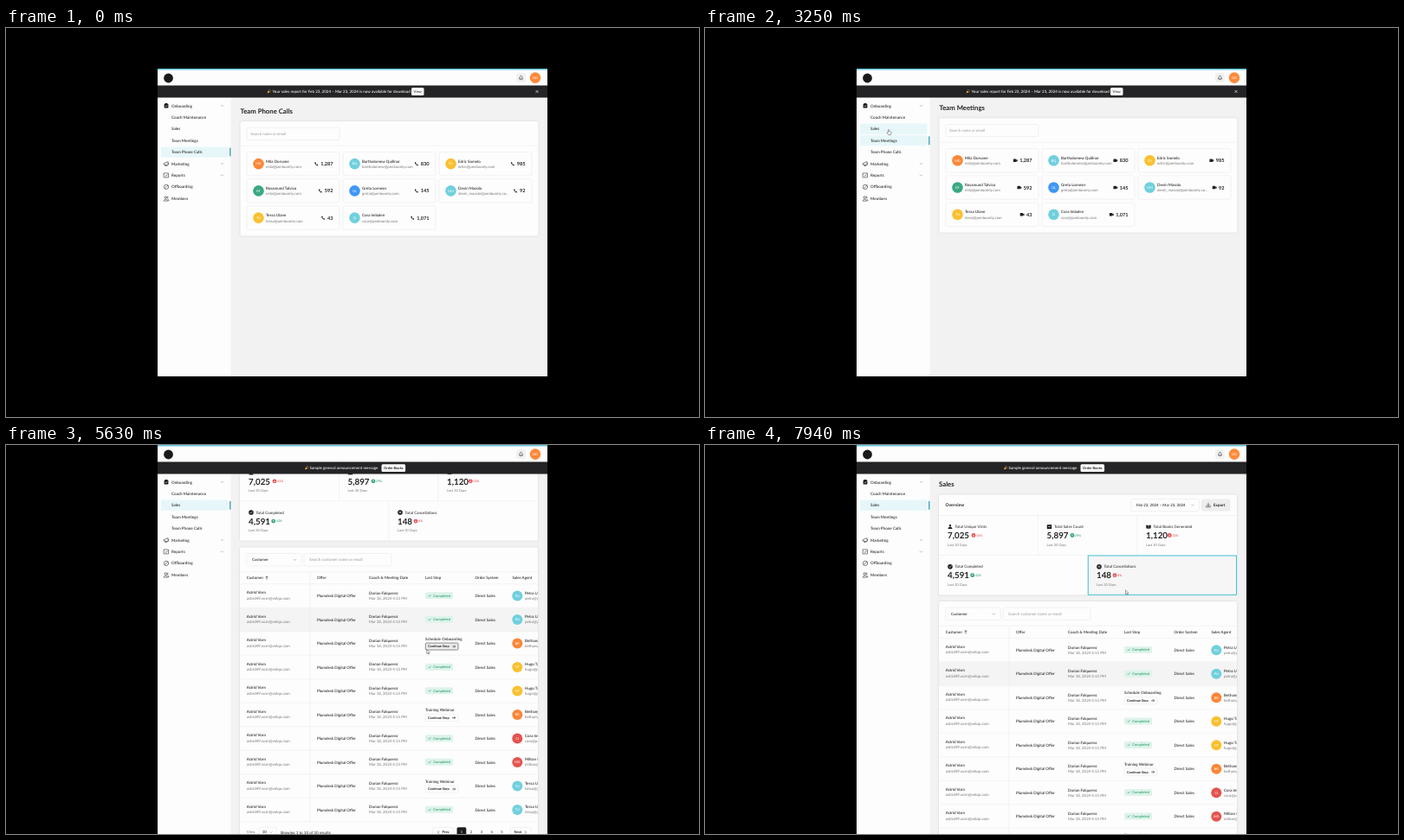
Recreate the animation shown at these times as an HTML page. Size 800 by 450 pixels, loop 8000 ms.

```html
<!DOCTYPE html>
<html lang="en">
<head>
<meta charset="utf-8">
<title>Team dashboard</title>
<style>
html, body { margin: 0; width: 100%; height: 100%; overflow: hidden; background: #000; }
svg { display: block; width: 100%; height: 100%; }
text { font-family: Lato, "Open Sans", sans-serif; font-weight: 500; fill: #222; text-rendering: geometricPrecision; white-space: pre; }
.b { font-weight: 700; }
.r { font-weight: 400; }
.g { font-weight: 400; fill: #777; }
.p { font-weight: 400; fill: #999; }
.w { fill: #fff; }
.up { fill: #2a9c70; }
.dn { fill: #e5484d; }
.ln { fill: none; stroke: #333; stroke-width: .6; stroke-linecap: round; stroke-linejoin: round; }
.rule { stroke: #ececec; stroke-width: .6; fill: none; }
.box { fill: #fdfdfd; stroke: #e9e9e9; stroke-width: .6; }
.panel { fill: #fdfdfd; filter: drop-shadow(0 .5px .8px #0002); }
</style>
</head>
<body>
<svg id="stage" viewBox="0 0 800 450" preserveAspectRatio="none"></svg>
<script>
const ORANGE = '#fb8637', CYAN = '#70d0de', YELLOW = '#fac02e', GREEN = '#3aa981', BLUE = '#3f97f4', RED = '#e5534f';

// Drawing helpers; text y is the optical middle of the line
const text = (x, y, s, size = 4.5, cls = '', anchor = 'start') =>
  `<text x="${x}" y="${(y + size * .35).toFixed(2)}" font-size="${size}" class="${cls}" text-anchor="${anchor}">${s}</text>`;
const rect = (x, y, w, h, fill, r = 0, cls = '') =>
  `<rect x="${x}" y="${y}" width="${w}" height="${h}" rx="${r}" ${fill ? `fill="${fill}"` : ''} class="${cls}"/>`;
const circle = (x, y, r, fill) => `<circle cx="${x}" cy="${y}" r="${r}" fill="${fill}"/>`;
const line = (d, cls = 'rule') => `<path d="${d}" class="${cls}"/>`;
const icon = (x, y, d, cls = 'ln', extra = '') => `<path transform="translate(${x} ${y})" d="${d}" class="${cls}" ${extra}/>`;
const chevron = (x, y, s = 1) => icon(x, y, `M${-1.3 * s} ${-.6 * s}L0 ${.7 * s}L${1.3 * s} ${-.6 * s}`, 'ln', 'style="stroke:#777;stroke-width:.45"');
const avatar = (x, y, r, fill, s) => circle(x, y, r, fill) + text(x, y, s, 3.8, 'w', 'middle');
const initials = name => name.split(' ').map(w => w[0]).join('');
const numWidth = (s, size) => [...s].reduce((w, c) => w + (c === ',' ? .24 : .58), 0) * size;

const NAV = ['Onboarding', 'Coach Maintenance', 'Sales', 'Team Meetings', 'Team Phone Calls', 'Marketing', 'Reports', 'Offboarding', 'Members'];
const navY = i => 42.9 + 13.42 * i;
const navRow = (i, id) => `<g id="${id}">${rect(179, navY(i) - 6.2, 77.5, 12.4, '#e7f7f9', 1.2)}</g>`;
const navBar = i => rect(258, navY(i) - 5, 1.5, 10, '#4aa9bb', .5);

function party(x) {
  return icon(x, 26.5, 'M-2 2L-.7-1.3L1.2.7Z', '', 'fill="#f5b63c"') + circle(x + 1.4, 25, .6, '#ef5a7a') +
    circle(x + .3, 24.3, .45, '#5cc6e8') + circle(x + 1.9, 26.6, .45, '#f5d04a');
}

function navIcons() {
  const at = i => navY(i), x = 185;
  return rect(182.6, at(0) - 2.3, 4.8, 5, '#1c1c1c', .9) + rect(183.9, at(0) - 3, 2.2, 1.4, '#1c1c1c', .4) +
    icon(x, at(0), 'M-.9 .4L-.2 1L1-.4', 'ln', 'style="stroke:#fff"') +
    icon(x, at(5), 'M-2.6-.4L2-2.4V2L-2.6 .9ZM-1.5 1.2L-1 2.7H.2V1.6M2.6-.8V.5') +
    icon(x, at(6), 'M-2.5-2.5H2.5V2.5H-2.5ZM-1.1 .1L-.2 1L1.3-.8') +
    icon(x, at(7), 'M2.7 0A2.7 2.7 0 1 1-2.7 0A2.7 2.7 0 1 1 2.7 0M-1.9 1.9L1.9-1.9') +
    icon(x, at(8), 'M.6-1.3A1.3 1.3 0 1 1-2-1.3A1.3 1.3 0 1 1 .6-1.3M-2.8 2.5C-2.8 .2 1.4 .2 1.4 2.5ZM1.4-2.5C2.6-2 2.5-.5 1.4-.2M2 .8C2.7 1.1 3 1.8 3 2.5H2.2');
}

function frame(height, banner, highlights) {
  const nav = NAV.map((s, i) => text(191, navY(i), s, 4.6)).join('');
  return rect(175, 33, 84.5, height - 33, '#fdfdfd') + highlights + nav + navIcons() +
    [0, 5, 6].map(i => chevron(249.5, navY(i))).join('') +
    rect(175, 0, 450, 19.6, '#fdfdfd') + rect(175, 0, 450, 1.5, '#62c9dc') +
    circle(187.5, 11, 5.4, '#1a1a1a') +
    rect(589, 5, 11, 11, '#f1f1f1', 3) +
    icon(594.5, 10.4, 'M-1.9 1.2C-1.1 .2-1.6-2.1 0-2.1S1.1 .2 1.9 1.2ZM-.5 2.2H.5') +
    avatar(611, 10.6, 6.3, '#ff8a3c', 'DG') +
    rect(175, 19.5, 450, 14, '#242325') + banner;
}

// Team pages
const TEAM = [
  ['Mila Dorvane', 'mila', '1,287', ORANGE], ['Bartholomew Quillnar', 'bartholomew', '830', CYAN], ['Edric Somelo', 'edric', '985', YELLOW],
  ['Rosamund Talvico', 'mila', '592', GREEN], ['Greta Lommer', 'greta', '145', BLUE], ['Devin Masola', 'devin_masola', '92', CYAN],
  ['Tessa Ulane', 'tessa', '43', YELLOW], ['Cora Imbalen', 'cora', '1,071', CYAN]];
const PHONE = 'M-1.9-1.5L-1-2.1L-.1-.8L-.6-.1C-.3 .5 .1 .8 .6 1L1.2 .4L2.2 1.3L1.6 2.1C-.4 2.2-2-.2-1.9-1.5Z';
const VIDEO = 'M-2.3-1.2Q-2.3-1.7-1.8-1.7H.7Q1.2-1.7 1.2-1.2V-.6L2.5-1.4V1.4L1.2 .6V1.2Q1.2 1.7 .7 1.7H-1.8Q-2.3 1.7-2.3 1.2Z';

function teamPage(title, glyph) {
  const cards = TEAM.map(([name, user, count, color], i) => {
    const x = 278 + 111 * (i % 3), y = 96.4 + 31.25 * Math.floor(i / 3), mid = y + 13.7;
    const mail = user + (user.length > 11 ? '@penloomly.co…' : '@penloomly.com');
    return rect(x, y, 107, 27.4, '', 2, 'box') + avatar(x + 13.5, mid, 6.3, color, initials(name)) +
      text(x + 22, mid - 3.1, name, 4.5) + text(x + 22, mid + 3.4, mail, 4.4, 'g') +
      text(x + 99.5, mid + .1, count, 5.6, 'b', 'end') +
      icon(x + 94.5 - numWidth(count, 5.6), mid, glyph, '', 'fill="#222"');
  }).join('');
  return text(270.5, 49.5, title, 7.75, 'b') + rect(270.5, 61, 344, 132.5, '', 2, 'panel') +
    rect(278, 68.3, 107, 14.2, '', 2, 'box') + text(282.2, 75.3, 'Search name or email', 4.4, 'p') +
    line('M270.5 89.2H614.5') + cards;
}

function teamScene() {
  const banner = party(303.5) +
    text(307.5, 26.5, 'Your sales report for Feb 23, 2024 – Mar 23, 2024 is now available for download', 4.52, 'w') +
    rect(468, 22, 14.5, 9, '#fdfdfd', 1.5) + text(475.2, 26.5, 'View', 4.1, '', 'middle') +
    icon(613, 26.5, 'M-1.3-1.3L1.3 1.3M1.3-1.3L-1.3 1.3', 'ln', 'style="stroke:#fff"');
  const marks = navRow(2, 'hoverSales') + navRow(3, 'hoverMeet') +
    `<g id="onCalls">${navRow(4, 'rowCalls')}${navBar(4)}</g><g id="onMeet">${navBar(3)}</g>`;
  return `<g id="team" transform="translate(0 47)">${rect(175, 0, 450, 356, '#f2f2f2')}
    <g id="calls">${teamPage('Team Phone Calls', PHONE)}</g>
    <g id="meets" transform="translate(0 -3.8)">${teamPage('Team Meetings', VIDEO)}</g>${frame(356, banner, marks)}</g>`;
}

// Sales page
const STATS = [
  [280, 94.5, 'Total Unique Visits', '7,025', '15%', 0, 30, 'M1.2-1.3A1.2 1.2 0 1 1-1.2-1.3A1.2 1.2 0 1 1 1.2-1.3M-2.5 2.6C-2.5-.4 2.5-.4 2.5 2.6Z'],
  [394.5, 94.5, 'Total Sales Count', '5,897', '29%', 1, 29.5, 'M-2.7-2.3H2.7V2.5H-2.7Z'],
  [509, 94.5, 'Total Books Generated', '1,120', '32%', 0, 27.3, 'M-2.7-2.1L-.2-1.5V2.4L-2.7 1.7ZM2.7-2.1L.2-1.5V2.4L2.7 1.7Z'],
  [280, 140.7, 'Total Completed', '4,591', '42%', 1, 28.7],
  [452, 140.7, 'Total Cancellations', '148', '4%', 0, 21]];
const DISC = 'M2.8 0A2.8 2.8 0 1 1-2.8 0A2.8 2.8 0 1 1 2.8 0';
const CHECK = 'M-1.2 .1L-.3 1L1.3-.9', CROSS = 'M-.9-.9L.9 .9M.9-.9L-.9 .9';

function stat([x, y, label, value, pct, up, gap, glyph]) {
  const tone = up ? '#2a9c70' : '#e5484d';
  const mark = up ? (label === 'Total Completed' ? CHECK : 'M-1.2 0H1.2') : CROSS;
  return icon(x + 3, y, glyph || DISC, '', 'fill="#1c1c1c"') +
    (glyph && !up ? '' : icon(x + 3, y, mark, 'ln', 'style="stroke:#fff"')) +
    text(x + 8.5, y, label, 4.5, 'r') + text(x, y + 10.3, value, 9.8, 'b') +
    circle(x + gap, y + 10, 2.4, tone) +
    icon(x + gap, y + 10, up ? 'M0 1.1V-1.1M-.9-.2L0-1.1L.9-.2' : 'M0-1.1V1.1M-.9 .2L0 1.1L.9 .2', 'ln', 'style="stroke:#fff;stroke-width:.5"') +
    text(x + gap + 3.1, y + 10, pct, 3.6, up ? 'up' : 'dn') + text(x, y + 20.6, 'Last 30 Days', 4, 'g');
}

const AGENTS = { P: ['Petra Ullem', CYAN], B: ['Bethany Rolk', ORANGE], H: ['Hugo Tarnel', YELLOW], C: ['Cora Imbalen', RED], M: ['Milton Dray', RED], T: ['Tessa Ulane', CYAN] };
const STEPS = { 2: 'Schedule Onboarding', 5: 'Training Webinar', 8: 'Training Webinar' };
const rowY = i => 223.4 + 27.5 * i;

function tableRow(key, i) {
  const top = rowY(i), y = top + 13.6, [name, color] = AGENTS[key];
  const step = STEPS[i]
    ? text(484, y - 5.1, STEPS[i], 4.5) +
      `<rect id="step${i}" x="484.3" y="${y - .3}" width="37.7" height="8" rx="1.2" class="box"/>` +
      text(487, y + 3.7, 'Continue Step', 3.9, 'b') + icon(517, y + 3.7, 'M-1.6 0H1.6M.3-1.3L1.6 0L.3 1.3')
    : rect(484, y - 4, 32, 8, '#ddf3e9', 1.5) + icon(489, y, CHECK, 'ln', 'style="stroke:#2a9468"') +
      text(493.3, y, 'Completed', 4.1, 'up');
  return (i === 1 ? rect(270, top, 344, 27.5, '#f4f4f4') : '') +
    text(277.7, y - 3.8, 'Astrid Vorn', 4.5) + text(277.7, y + 2.8, 'astrid49.vorn@velqo.com', 4.5, 'g') +
    text(359, y + .1, 'Plumdesk Digital Offer', 4.5) +
    text(419, y - 3, 'Dorian Falquerez', 4.5) + text(419, y + 3.1, 'Mar 18, 2024 4:15 PM', 4.4, 'g') +
    step + text(541.5, y + .1, 'Direct Sales', 4.5) + avatar(590.3, y + .2, 6, color, initials(name)) +
    text(599, y - 3, name, 4.5) + text(599, y + 3.1, name.split(' ')[0].toLowerCase() + '@penloomly.com', 4.4, 'g') +
    line(`M270 ${top + 27.5}H614`);
}

function footer(y) {
  const pages = [537, 549, 560.6, 572.4].map((x, i) => text(x, y, i + 2, 4, '', 'middle')).join('');
  return text(277.7, y, 'View', 4.4, 'g') + rect(292, y - 5.8, 20, 11.6, '', 1.5, 'box') + text(295.8, y, '10', 4.4) + chevron(306, y) +
    text(316.7, y, 'Showing 1 to 10 of 30 results', 4.5, 'r') +
    rect(492.5, y - 5.6, 24, 11.2, '', 1.5, 'box') + icon(499, y, 'M.7-1.3L-.6 0L.7 1.3') + text(503.5, y, 'Prev', 4, 'b') +
    rect(520.5, y - 5.6, 10.8, 11.2, '#1c1c1c', 1.5) + text(525.9, y, 1, 4, 'w', 'middle') + pages +
    rect(582, y - 5.6, 24, 11.2, '', 1.5, 'box') + text(586.5, y, 'Next', 4, 'b') + icon(600, y, 'M-.7-1.3L.6 0L-.7 1.3');
}

function salesScene() {
  const overview = rect(270, 57.5, 344, 116, '', 2, 'panel') + text(277.5, 69.6, 'Overview', 5, 'b') +
    rect(491.5, 62.6, 79, 14, '', 2, 'box') + text(498, 69.6, 'Feb 23, 2024 – Mar 23, 2024', 4.4) + chevron(563, 69.6) +
    rect(573, 62.6, 33.5, 14, '#eeeeee', 2) + icon(581, 69.5, 'M0-2.4V.9M-1.3-.4L0 .9L1.3-.4M-2.3 1V2.3H2.3V1') +
    text(587, 69.6, 'Export', 4.5, 'b') +
    line('M270 81.5H614M270 127.5H614M384.5 81.5V127.5M499 81.5V127.5M442 127.5V173.5') +
    '<rect id="cancel" x="442.3" y="128" width="171.2" height="45.3" fill="#f6f6f6" stroke="#48c3d8" stroke-width="1"/>' +
    STATS.map(stat).join('');
  const heads = [[277.7, 'Customer'], [359, 'Offer'], [419, 'Coach &amp; Meeting Date'], [484, 'Last Step'], [541.5, 'Order System'], [584.5, 'Sales Agent']];
  const table = rect(270, 181, 344, 343, '', 2, 'panel') +
    rect(277.7, 188.2, 63.5, 14.4, '', 2, 'box') + text(284, 195.5, 'Customer', 4.4) + chevron(333.5, 195.5) +
    rect(344, 188.2, 101, 14.4, '', 2, 'box') + text(350, 195.5, 'Search customer name or email', 4.5, 'p') +
    line('M270 209.3H614M270 223.4H614') + heads.map(([x, s]) => text(x, 216.4, s, 4.5)).join('') +
    icon(301, 216.3, 'M0 1.7V-1.7M-1.2-.5L0-1.7L1.2-.5') +
    `<g clip-path="url(#sheet)">${[...'PPBHHBCMTT'].map(tableRow).join('')}</g>` + line('M351 209.3V498.4') + footer(510.6);
  const banner = party(347) + text(350.5, 26.6, 'Sample general announcement message', 4.5, 'w') +
    rect(433.5, 22.2, 27.6, 8.8, '#fdfdfd', 1.5) + text(447.3, 26.6, 'Order Books', 4, 'b', 'middle');
  return `<g id="sales">${rect(175, 0, 450, 450, '#f2f2f2')}<g id="page">${text(270, 45.5, 'Sales', 7.75, 'b')}${overview}${table}</g>
    ${frame(450, banner, navRow(2, 'rowSales') + navBar(2))}</g>`;
}

const stage = document.getElementById('stage');
stage.innerHTML = `<defs><clipPath id="sheet">${rect(270, 181, 343.8, 343)}</clipPath></defs>` + teamScene() + salesScene() +
  `<g id="cursor" stroke="#444" stroke-width=".5" stroke-linejoin="round" fill="#fff">
    <path id="arrow" d="M0 0V4.8L1.2 3.8L2 5.6L2.8 5.2L2 3.5H3.4Z"/>
    <path id="hand" d="M-.6 .5Q0-.5 .6 .5V2.2L2.6 2.7Q3.2 3 3 4L2.5 6.2H-.4L-2 3.9Q-1.8 3.2-.6 3.9Z"/></g>`;
const el = {};
stage.querySelectorAll('[id]').forEach(n => el[n.id] = n);

// Motion: [ms, values...]
const LOOP = 8000, MEET_AT = 2500, SALES_AT = 3750;
const PATH = [[60, 706, 236], [810, 330, 170], [1200, 420, 225], [1630, 502, 168], [2000, 233.8, 134.2], [2380, 210, 130.5], [2600, 210, 130.5],
  [3250, 212, 117.3], [3749, 212, 117.3], [3750, 212, 70.3], [4440, 545, 132], [4690, 545, 132], [4810, 517, 145.3], [4960, 517, 145.3],
  [5630, 485.7, 236.6], [6880, 479.3, 334.6], [7880, 485.5, 167.8]];
const SCROLL = [[4960, 0], [6300, 125], [6950, 125], [7860, 0]];

function sample(table, t) {
  const i = table.findIndex(k => k[0] > t);
  if (i < 0) return table.at(-1).slice(1);
  if (!i) return table[0].slice(1);
  const a = table[i - 1], b = table[i], u = (t - a[0]) / (b[0] - a[0]), e = u * u * (3 - 2 * u);
  return a.slice(1).map((v, j) => v + (b[j + 1] - v) * e);
}

const show = (n, on) => n.style.display = on ? '' : 'none';
const inside = (x, y, l, t, w, h) => x >= l && x <= l + w && y >= t && y <= t + h;

function draw(t) {
  const [x, y] = sample(PATH, t), [s] = sample(SCROLL, t);
  const sales = t >= SALES_AT, meet = t >= MEET_AT;
  const overNav = i => inside(x, y - (sales ? 0 : 47), 179, navY(i) - 3.6, 77, 7.2);
  show(el.team, !sales);
  show(el.sales, sales);
  show(el.calls, !meet);
  show(el.meets, meet);
  show(el.onCalls, !meet);
  show(el.onMeet, meet);
  show(el.hoverMeet, meet || overNav(3));
  show(el.hoverSales, overNav(2));
  el.page.setAttribute('transform', `translate(0 ${-s})`);
  show(el.cancel, y > 33.5 && inside(x, y + s, 442, 128, 172, 45.5));
  for (const i in STEPS) {
    const on = inside(x, y + s, 484, rowY(+i) + 13.3, 38, 8.2);
    el['step' + i].style.cssText = on ? 'fill:#ececec;stroke:#444' : '';
  }
  const hand = [1, 2, 3, 4].some(overNav);
  show(el.cursor, t >= 60);
  show(el.hand, hand);
  show(el.arrow, !hand);
  el.cursor.setAttribute('transform', `translate(${x} ${y})`);
}

function tick() {
  draw(performance.now() % LOOP);
  requestAnimationFrame(tick);
}
tick();
</script>
</body>
</html>
```
